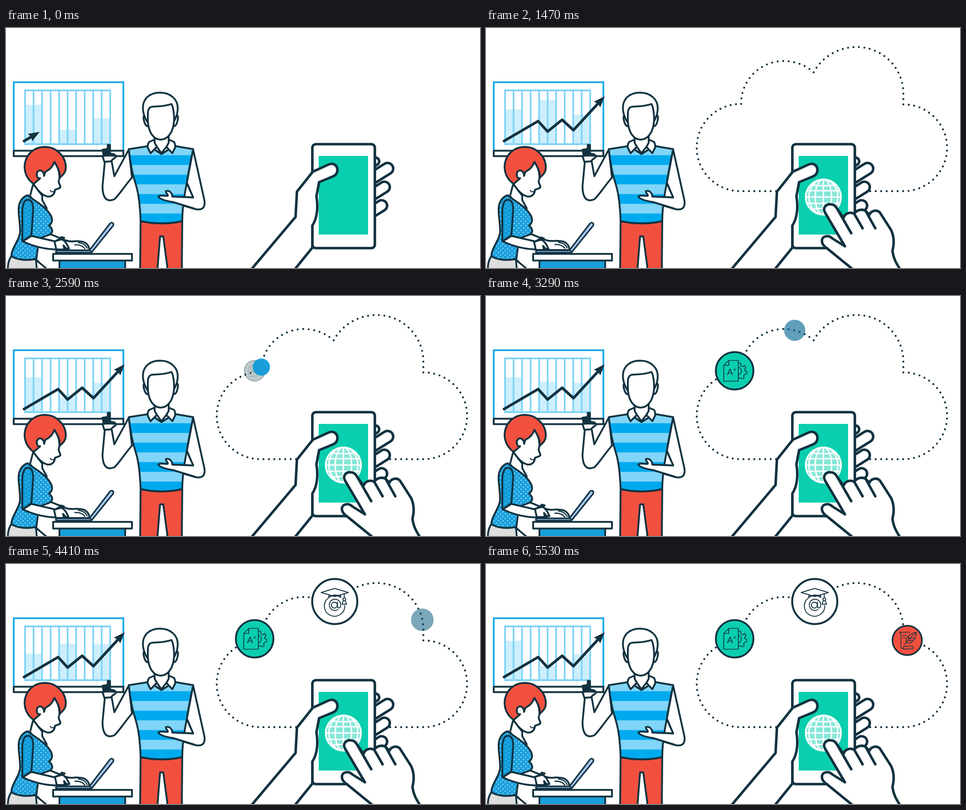
An HTML page for the animation above (5600 ms loop, 1046x531 px).

```html
<!DOCTYPE html>
<html lang="en">
<head>
<meta charset="utf-8">
<title>Cloud learning</title>
<style>
html, body { margin: 0; width: 100%; height: 100%; overflow: hidden; background: #fff; }
svg { display: block; width: 100vw; height: 100vh; }
.ink { stroke: #123240; stroke-width: 4; stroke-linejoin: round; stroke-linecap: round; fill: none; }
.w { fill: #fff; }
.red { fill: #f2503f; }
.bold { stroke-width: 5.6; }
.thin { stroke-width: 1.7; }
.net { fill: none; stroke: #fff; stroke-width: 3.2; }
text { font-family: Lato, "Open Sans", sans-serif; fill: #123240; }
</style>
</head>
<body>
<svg viewBox="0 0 1046 531" preserveAspectRatio="none">
<defs>
  <pattern id="dots" width="10" height="10" patternUnits="userSpaceOnUse">
    <rect width="10" height="10" fill="#18a0dc"/>
    <circle cx="2.5" cy="2.5" r="1.7" fill="#80cdf2"/><circle cx="7.5" cy="7.5" r="1.7" fill="#80cdf2"/>
  </pattern>
  <path id="vest" d="M271 268L316 261L343 279L372 261L413 268C407 298 402 320 399 343C393 372 389 398 389 427C362 434 325 434 297 427C296 398 293 368 287 348C279 324 274 298 271 268Z"/>
  <clipPath id="knit"><use href="#vest"/></clipPath>
  <path id="track"/>
</defs>

<g id="board">
  <rect x="17" y="120" width="242" height="160" fill="#fff" stroke="#0ea5e6" stroke-width="3.6"/>
  <g id="bars" fill="#cdeefc"></g>
  <path id="grid" fill="none" stroke="#80d5f8" stroke-width="3.8"/>
  <rect class="ink w" x="17" y="271.5" width="242" height="12"/>
  <path id="trend" class="ink" style="stroke-width:6"/>
  <path id="head" d="M0 0L-25 -9.5L-22 0L-25 9.5Z" fill="#123240"/>
</g>

<g id="man">
  <path class="ink w" d="M328 240V252L343 277L359 252V240"/>
  <path class="ink red" d="M297 427L296 536H334L340 461H347L357 536H388L389 427C362 434 325 434 297 427Z"/>
  <path class="ink w" d="M271 269L239 328L233 294L218 296L213 350C213 376 222 386 239 379C248 372 265 345 278 331Z"/>
  <path class="ink w" d="M413 269L438 382C440 398 433 403 419 401L368 386V373L413 375L399 343Z"/>
  <g id="stripes" clip-path="url(#knit)"></g>
  <use href="#vest" class="ink"/>
  <path class="ink w" d="M328 247L316 252C313 256 312 261 313 265L319 277L333 263L343 277L354 263L367 277L373 265C374 261 373 256 371 252L359 247"/>
  <path class="ink" d="M328 245V254L333 263M359 245V254L354 263"/>
  <path class="ink w" d="M400 344L413 375L367 373C367 365 360 358 353 361C351 364 358 368 357 371C350 373 341 368 336 373C340 379 355 383 368 385L417 400"/>
  <path class="ink w" d="M217 296L213 283L229 282L244 283C242 288 234 290 232 295Z"/>
  <path d="M212.5 269L224 267V259.5C224 257 230 257 230 259.5V279L215 282Z" fill="#123240" stroke="#123240" stroke-width="3" stroke-linejoin="round"/>
  <path class="ink" d="M231 278L240 280"/>
  <path class="ink w" d="M313 196C306 188 302 194 304 203C306 213 310 219 315 217M370 196C377 187 381 195 379 203C377 214 373 219 369 216"/>
  <path class="ink w" d="M313 192C311 235 329 247 341 247C355 247 373 233 371 190"/>
  <path class="ink w" d="M313 210C306 199 302 188 302 176C303 154 319 143 340 143C363 143 379 158 379 177C379 190 375 198 371 206C371 192 370 176 365 168C350 174 336 173 325 174C316 174 313 180 313 190Z"/>
</g>

<g id="woman">
  <path class="ink" style="fill:#ddd" d="M12 504C5 515 4 524 4 536H90L66 512Z"/>
  <path d="M66 514L88 533H67Z" fill="#fff"/><path class="ink" d="M66 511L68 534M66 513L89 532"/>
  <path class="ink w" d="M60 345L53 372C65 388 78 397 90 399L80 381V371Z"/>
  <path class="ink w" d="M60 344C68 356 78 370 92 373C102 374 108 366 108 358C113 356 120 355 120 351L116 340C120 330 118 312 107 296L80 314Z"/>
  <path class="ink red" d="M61 345C46 334 41 320 41 306C43 277 65 263 85 263C112 263 132 285 132 308C132 319 127 324 119 331C119 322 117 314 113 307L107 296C103 307 96 314 87 318L84 327C83 316 74 312 69 319C66 326 71 334 75 333Z"/>
  <path class="ink w" d="M84 327C84 316 74 311 69 319C66 326 70 335 75 332"/>
  <path class="ink" style="stroke-width:2.2" d="M108 359C104 365 99 362 98 359"/>
  <g id="far">
    <path class="ink w" d="M74 464L95 455L132 470C146 475 148 470 162 472C176 472 184 481 184 492H140L120 485Z"/>
    <path class="ink" style="stroke-width:2.6" d="M152 480C162 479 169 482 174 488M160 475C170 476 176 480 179 487"/>
  </g>
  <path class="ink" style="fill:url(#dots)" d="M48 370C62 382 87 394 97 412C104 422 103 431 95 437C104 445 104 452 97 457L73 466L67 511C45 515 25 513 12 505C11 488 33 465 31 448C31 425 25 405 29 391C33 378 41 372 48 370Z"/>
  <path class="ink w" d="M37 472L56 460L112 473L116 490C88 490 60 483 37 472Z"/>
  <path class="ink" style="fill:#109bd9" d="M47 380C37 382 35 398 36 420V472L56 459L60 402C60 386 55 379 47 380Z"/>
  <path d="M44 386V465M50 390V458" stroke="#6fc4ec" stroke-width="2.6" stroke-linecap="round" stroke-dasharray="0 9" fill="none"/>
  <path class="ink" style="fill:#a8c8f8;stroke-width:3.4" d="M110 495C111 491 116 492 125 492H184L229 433C233 428 240 432 236 438L190 495Q188 498 182 497H114Q110 498 110 495Z"/>
  <path class="ink" style="stroke-width:2.6" d="M184 492L190 495"/>
  <g id="near">
    <path class="ink w" d="M108 472L124 467C132 471 136 479 140 488L134 488L128 481L130 490H112Z"/>
    <path class="ink" style="fill:#123240;stroke-width:3" d="M112 470L119 466L123 462L130 464L127 468L118 469Z"/>
  </g>
  <path class="ink" style="fill:#18a0dc" d="M118 514H263V536H118Z"/>
  <rect class="ink w" x="104" y="499.7" width="174" height="14.8"/>
</g>

<g id="cloud"></g>

<g id="icon0">
  <circle class="disc" r="41.5" stroke="#123240" stroke-width="4"/>
  <g class="ink thin">
    <path d="M-13 -23H8V23H-24V-12ZM-13 -23V-12H-24"/>
    <path d="M8 -18L13 -17L14 -11L18 -9L22 -12L25 -7L22 -3L23 0L27 1V6L22 8L20 11L21 16L16 18L13 15L8 17"/>
    <path d="M8 -8C17 -6 17 7 8 9"/>
  </g>
  <text x="-17" y="9" font-size="20">A</text><text x="-4" y="1" font-size="14">+</text>
</g>
<g id="icon1">
  <circle class="disc" r="49.8" stroke="#123240" stroke-width="4.2"/>
  <g class="ink" style="stroke-width:2">
    <path d="M-30 -20L0 -29L30 -20L0 -11ZM-13 -15V-9C-6 -16 8 -16 13 -9V-15M21 -17V-8"/>
    <circle cx="21" cy="-5" r="3"/><path d="M19 -2L16 6H26L23 -2"/>
    <path d="M-14 -8A22.5 22.5 0 1 0 22 9M-14 -8A22 22 0 0 1 13 -9"/>
    <circle cx="-1" cy="8" r="6.5"/>
    <path d="M6 1V10C6 17 14 15 13 7A12.5 12.5 0 1 0 7 18"/>
  </g>
</g>
<g id="icon2">
  <circle class="disc" r="32.5" stroke="#123240" stroke-width="3.6"/>
  <g class="ink" style="stroke-width:1.5">
    <path d="M-17 -18H5M-17 -18C-12 -14 -14 -8 -14 -3V13C-14 18 -10 19 -6 19H11C14 18 14 14 12 13H-6C-9 13 -7 19 -10 19M-10 -11H-2M-10 -6H-4"/>
    <path d="M-6 9C1 0 9 -9 20 -18C20 -7 15 3 4 6L-2 5C-5 -5 4 -15 20 -18M3 -1V-8M7 -4L15 -5M3 0L11 0"/>
  </g>
</g>
<circle id="ball"/>

<g id="phone">
  <g id="fingers" stroke-linecap="round"></g>
  <rect class="ink w bold" x="676" y="257" width="138" height="230" rx="8"/>
  <rect x="690" y="283" width="109" height="174" fill="#0acfaf"/>
  <g id="globe">
    <circle r="39" fill="#fff" fill-opacity=".5" stroke="#fff" stroke-width="3.6"/>
    <path class="net" d="M0 -39V39M-39 0H39M-36 -14H36M-36 14H36M-28 -27Q0 -23 28 -27M-28 27Q0 23 28 27"/>
    <ellipse class="net" rx="18" ry="39"/><ellipse class="net" rx="32" ry="39"/>
  </g>
  <path class="ink w bold" d="M538 538L639 418L642 362L677 318L712 302C724 297 733 306 731 317C730 323 726 327 720 329L691 341L685 372C689 396 687 421 676 437V486L634 538"/>
</g>

<g id="hand">
  <path class="ink w bold" d="M812 536L752 487C738 478 738 463 750 461C757 459 761 463 765 466L792 483L748 408C742 397 752 389 760 390C768 390 771 394 775 400L789 420C792 410 803 406 813 411C818 402 832 399 839 406L846 413C850 404 862 401 869 408L894 447C902 465 900 480 897 493C899 510 906 522 914 534L1000 720H990Z"/>
  <path class="ink bold" d="M775 400L806 454M812 410L831 443M838 405L859 443"/>
</g>
</svg>

<script>
const LOOP = 5600;
const $ = id => document.getElementById(id);
const set = (el, o) => { for (const k in o) el.setAttribute(k, o[k]); };
const add = (id, tag, o) => {
  const el = document.createElementNS('http://www.w3.org/2000/svg', tag);
  set(el, o);
  return $(id).appendChild(el);
};
const clamp = x => Math.min(1, Math.max(0, x));
const span = (t, a, b) => clamp((t - a) / (b - a));
const smooth = x => x * x * (3 - 2 * x);
const mix = (a, b, k) => a + (b - a) * k;
const blend = (a, b, k) => `rgb(${a.map((v, i) => Math.round(mix(v, b[i], k)))})`;

// Value at time t from [time, value] pairs
function keyed(t, keys, ease = x => x) {
  let i = 1;
  while (i < keys.length - 1 && t > keys[i][0]) i++;
  const [a, b] = [keys[i - 1], keys[i]];
  return mix(a[1], b[1], ease(span(t, a[0], b[0])));
}

// Fixed repeats
let lines = 'M42 138H230V257H42Z';
for (let i = 1; i < 10; i++) lines += `M${42 + i * 18.8} 138V257`;
$('grid').setAttribute('d', lines);
for (let i = 0; i < 8; i++)
  add('stripes', 'rect', { x: 260, y: 260 + i * 21.5, width: 170, height: 22, fill: i % 2 ? '#00aaee' : '#80d5f8' });
for (const [x, y, w] of [[815, 295, 21], [842, 311, 29], [835, 352, 28], [829, 393, 28]]) {
  const d = `M${x - 40} ${y + 25}L${x} ${y}`;
  add('fingers', 'path', { d, stroke: '#123240', 'stroke-width': w + 1.5 });
  add('fingers', 'path', { d, stroke: '#fff', 'stroke-width': w - 9.5 });
}

// Cloud outline, split at its corners so that each one gets a dot
const lobes = [
  ['676 361', 'H560A96.5 96.5 0 0 1 563 168'],
  ['563 168', 'A94 94 0 0 1 657 73A99.6 99.6 0 0 1 723 98'],
  ['723 98', 'A108.6 108.6 0 0 1 818 42A103 103 0 0 1 921 145V169'],
  ['921 169', 'A96 96 0 0 1 922 361H800']
];
for (const [from, curve] of lobes) {
  const lobe = add('cloud', 'path', { class: 'ink', d: `M${from}${curve}`, style: 'stroke-width:4.4' });
  const len = lobe.getTotalLength();
  lobe.setAttribute('stroke-dasharray', `0 ${len / Math.round(len / 12.1)}`);
}
const track = $('track');
track.setAttribute('d', `M${lobes[0][0]}${lobes.map(l => l[1]).join('')}`);

const barTimes = [0, 770, 1470, 2590, 3920, 4830, 5530];
const bars = [
  [42, [170, 208, 180, 180, 180, 213, 170]],
  [117, [225, 182, 159, 225, 159, 190, 225]],
  [192, [200, 168, 192, 192, 192, 165, 200]]
].map(([x, tops]) => ({
  el: add('bars', 'rect', { x, width: 38 }),
  keys: tops.map((y, i) => [barTimes[i], y])
}));

const zigzag = [[40, 250], [115, 206], [136, 229], [168, 203], [193, 226], [262, 151]];
function drawTrend(t) {
  let left = 40 + t * .2065, d = 'M40 250';
  for (let i = 1; i < zigzag.length; i++) {
    const [x0, y0] = zigzag[i - 1], [x1, y1] = zigzag[i];
    const len = Math.hypot(x1 - x0, y1 - y0), ux = (x1 - x0) / len, uy = (y1 - y0) / len;
    const last = i === zigzag.length - 1;
    if (left > len && !last) { d += `L${x1} ${y1}`; left -= len; continue; }
    const n = Math.min(left, len), shaft = Math.max(0, n - 18);
    d += `L${x0 + ux * shaft} ${y0 + uy * shaft}`;
    const turn = Math.atan2(uy, ux) * 180 / Math.PI;
    $('head').setAttribute('transform', `translate(${x0 + ux * n} ${y0 + uy * n}) rotate(${turn})`);
    break;
  }
  $('trend').setAttribute('d', d);
}

const icons = [
  { x: 548.7, y: 165.5, start: 2410, color: [10, 207, 175] },
  { x: 725.5, y: 83, start: 3500, color: [255, 255, 255] },
  { x: 929.5, y: 169, start: 4494, color: [242, 80, 63] }
];
const ashen = [114, 127, 133];
function drawIcon(icon, i, t) {
  const p = span(t, icon.start, icon.start + 420);
  const settle = smooth(span(t, icon.start + 420, icon.start + 760));
  const size = p < 1 ? p * 1.27 : mix(1.27, 1, settle);
  const g = $('icon' + i);
  set(g, { transform: `translate(${icon.x} ${icon.y}) scale(${size})`, opacity: p });
  g.firstElementChild.setAttribute('fill', blend(ashen, icon.color, p ** 3));
}

const route = [[1470, 0], [2590, 430], [3150, 560], [3920, 738], [4830, 1031], [5040, 1125], [5480, 1361]];
function drawBall(t) {
  const at = track.getPointAtLength(Math.min(keyed(t, route), track.getTotalLength()));
  const pulse = (1 - Math.cos((t - 2590) / 527 * 2 * Math.PI)) / 2;
  set($('ball'), {
    cx: at.x, cy: at.y, r: 19 + 6 * pulse,
    fill: blend([14, 155, 217], [0, 83, 119], pulse),
    opacity: t > 1470 && t < 5480 ? .94 - .43 * pulse : 0
  });
}

function draw(t) {
  drawTrend(t);
  for (const b of bars) {
    const y = keyed(t, b.keys, smooth);
    set(b.el, { y, height: 257 - y });
  }

  const tap = Math.sin(t / 280 * 2 * Math.PI);
  $('near').setAttribute('transform', `translate(${-1 - tap} ${tap})`);
  $('far').setAttribute('transform', `translate(0 ${-tap * .8})`);

  const rise = smooth(span(t, 30, 680));
  $('hand').setAttribute('transform', `translate(0 ${150 * (1 - rise)})`);

  const g = keyed(t, [[630, 0], [770, .91], [910, 1.1], [1090, 1]]);
  set($('globe'), { transform: `translate(744.5 ${mix(376, 374, span(t, 770, 1000))}) scale(${g})`, opacity: span(t, 560, 910) });

  const c = keyed(t, [[800, .6], [1260, 1.09], [1420, 1]], smooth);
  set($('cloud'), { transform: `translate(741 201) scale(${c}) translate(-741 -201)`, opacity: span(t, 800, 1200) });

  icons.forEach((icon, i) => drawIcon(icon, i, t));
  drawBall(t);
}

const begin = performance.now();
function tick() {
  // The picture advances in 70 ms steps
  const t = (performance.now() - begin) % LOOP;
  draw(Math.floor(t / 70) * 70);
  requestAnimationFrame(tick);
}
tick();
</script>
</body>
</html>
```
